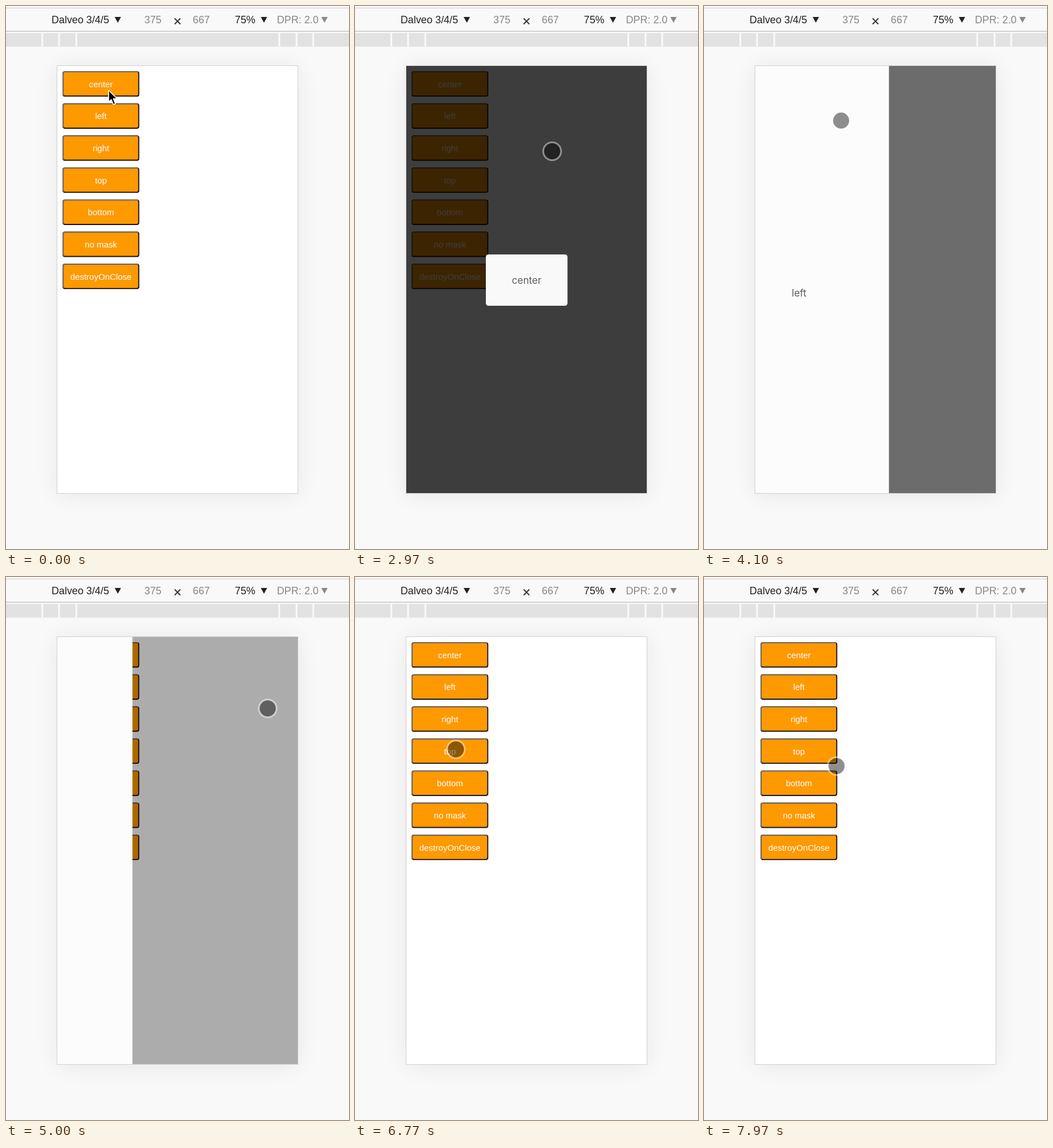
Animation, 595 px wide and 942 px high, one loop 8000 ms. Source, as an HTML page with a canvas:

```html
<!DOCTYPE html>
<html lang="en">
<head>
<meta charset="utf-8">
<title>Popup demo</title>
<style>
  html, body { margin: 0; width: 100%; height: 100%; overflow: hidden; background: #f9f9f9; }
  canvas { display: block; }
</style>
</head>
<body>
<canvas id="stage" width="595" height="942"></canvas>
<script>
const ctx = document.getElementById('stage').getContext('2d');
const LOOP = 8000;
const ZOOM = 1.113;
const PAGE = { x: 89, y: 104, w: 417, h: 741 };
const DRAWER = 280 * ZOOM;
const FADE = 300;
const MASK_ALPHA = 0.775;
const ARROW_UNTIL = 30;
const START = { x: 178, y: 154 };
const END = { t: 7970, x: 230, y: 328 };
const UI_FONT = '"Liberation Sans", Arial, sans-serif';
const POPUP_FONT = '17px Inter, sans-serif';
const LABELS = ['center', 'left', 'right', 'top', 'bottom', 'no mask', 'destroyOnClose'];

// press: the point on the button, tap: the point on the mask that closes the popup,
// leave: when the pointer sets off for the mask, dip: how far that trip sags
const POPUPS = [
  { side: 'center', open: 1900, leave: 2430, close: 2962, press: [158, 143], tap: [342, 252], dip: 190 },
  { side: 'left', open: 3967, leave: 3870, close: 4900, press: [180, 191], tap: [454, 228], dip: 0 },
  { side: 'right', open: 5621, leave: 5850, close: 6190, press: [170, 249], tap: [150, 320], dip: 0 },
  { side: 'top', open: 6880, leave: 6960, close: 7470, press: [175, 299], tap: [250, 460], dip: 0 }
];

const stop = (t, x, y, dip = 0) => ({ t, x, y, dip });

// The pointer looks over the buttons, then goes from button to mask for every popup
const PATH = [
  stop(ARROW_UNTIL, START.x, START.y),
  stop(300, 124, 453), stop(470, 124, 453),
  stop(1270, 162, 339), stop(1430, 161, 148),
  ...POPUPS.flatMap(({ open, leave, close, press, tap, dip }) => [
    stop(Math.min(open, leave) - 120, ...press), stop(leave, ...press),
    stop(close - 250, ...tap, dip), stop(close + 100, ...tap)
  ]),
  stop(END.t, END.x, END.y)
];

// The standard CSS "ease" curve: cubic-bezier(.25, .1, .25, 1)
function ease(x) {
  if (x <= 0) return 0;
  if (x >= 1) return 1;
  const curve = (a, b, s) => 3 * a * s * (1 - s) ** 2 + 3 * b * s * s * (1 - s) + s ** 3;
  let lo = 0, hi = 1;
  for (let i = 0; i < 24; i++) {
    const mid = (lo + hi) / 2;
    if (curve(0.25, 0.25, mid) < x) lo = mid; else hi = mid;
  }
  return curve(0.1, 1, lo);
}

function rect(x, y, w, h, color) {
  ctx.fillStyle = color;
  ctx.fillRect(x, y, w, h);
}

function roundRect(x, y, w, h, r, color) {
  ctx.beginPath();
  ctx.roundRect(x, y, w, h, r);
  ctx.fillStyle = color;
  ctx.fill();
}

function polygon(points, color) {
  ctx.beginPath();
  points.forEach(([x, y]) => ctx.lineTo(x, y));
  ctx.closePath();
  ctx.fillStyle = color;
  ctx.fill();
}

function text(str, x, y, font, color, align = 'left') {
  ctx.font = font;
  ctx.fillStyle = color;
  ctx.textAlign = align;
  ctx.fillText(str, x, y);
}

function drawToolbar() {
  rect(0, 0, 595, 942, '#f9f9f9');
  rect(0, 3, 595, 1, '#cdcdcd');
  rect(0, 43, 595, 1.5, '#c3c3c3');

  const font = '17.8px ' + UI_FONT;
  const dark = '#222', grey = '#888';
  text('Dalveo 3/4/5', 79, 30, font, dark);
  text('375', 240, 30, font, grey);
  text('667', 324, 30, font, grey);
  text('75%', 397, 30, font, dark);
  text('DPR: 2.0', 470, 30, font, grey);
  for (const [x, color] of [[194, dark], [447.5, dark], [552.5, grey]]) {
    polygon([[x - 5.5, 19], [x + 5.5, 19], [x, 29]], color);
  }

  ctx.strokeStyle = '#333';
  ctx.lineWidth = 1.8;
  ctx.beginPath();
  for (const dir of [-1, 1]) {
    ctx.moveTo(297.5 - 5 * dir, 21.5);
    ctx.lineTo(297.5 + 5 * dir, 31.5);
  }
  ctx.stroke();

  // Width marks mirrored around the middle
  rect(0, 47, 595, 23.5, '#e2e2e2');
  for (const d of [176, 206, 235]) {
    for (const x of [298 - d, 298 + d]) rect(x - 1.5, 47, 3, 23.5, '#fafafa');
  }
}

function drawButton(label, x, y) {
  const w = 120 * ZOOM, h = 40 * ZOOM, b = 2.1;
  ctx.save();
  ctx.beginPath();
  ctx.roundRect(x, y, w, h, 4.4);
  ctx.clip();
  rect(x, y, w, h, '#1c1416');
  polygon([[x, y], [x + w, y], [x + w - 4, y + 4], [x + 4, y + h - 4], [x, y + h]], '#6b6564');
  ctx.restore();
  roundRect(x + b, y + b, w - 2 * b, h - 2 * b, 2.4, '#fe9900');
  text(label, x + w / 2, y + 27.7, '14.84px ' + UI_FONT, '#fff', 'center');
}

function drawPage() {
  ctx.save();
  ctx.shadowColor = 'rgba(0,0,0,0.08)';
  ctx.shadowBlur = 38;
  ctx.shadowOffsetY = 3;
  rect(PAGE.x, PAGE.y, PAGE.w, PAGE.h, '#fff');
  ctx.restore();
  rect(PAGE.x - 1, PAGE.y - 1, PAGE.w + 2, PAGE.h + 2, '#d0d0d0');
  rect(PAGE.x, PAGE.y, PAGE.w, PAGE.h, '#fff');
  const margin = 8 * ZOOM;
  LABELS.forEach((label, i) => drawButton(label, PAGE.x + margin, PAGE.y + margin + i * 50 * ZOOM));
}

function drawPopup({ side, open, close }, t) {
  const shown = t < close ? ease((t - open) / FADE) : 1 - ease((t - close) / FADE);
  if (shown <= 0) return;

  ctx.save();
  ctx.beginPath();
  ctx.rect(PAGE.x, PAGE.y, PAGE.w, PAGE.h);
  ctx.clip();
  rect(PAGE.x, PAGE.y, PAGE.w, PAGE.h, `rgba(0,0,0,${MASK_ALPHA * shown})`);

  const hidden = (1 - shown) * DRAWER;
  const panel = '#fcfcfc';
  const label = (x, y) => text(side, x, y, POPUP_FONT, '#5c5c5c', 'center');
  if (side === 'center') {
    ctx.globalAlpha = shown;
    roundRect(227, 431, 141.6, 89, 4.4, panel);
    label(297.7, 482);
  } else if (side === 'top') {
    const y = PAGE.y - hidden;
    rect(PAGE.x, y, PAGE.w, DRAWER, panel);
    label(320, y + DRAWER / 2 + 6.5);
  } else {
    const x = side === 'left' ? PAGE.x - hidden : PAGE.x + PAGE.w - DRAWER + hidden;
    rect(x, PAGE.y, DRAWER, PAGE.h, panel);
    label(x + DRAWER / 2, 504.3);
  }
  ctx.restore();
}

function pointerAt(t) {
  const next = PATH.findIndex(s => s.t > t);
  if (next < 0) return [END.x, END.y];
  const from = PATH[next - 1], to = PATH[next];
  const u = (t - from.t) / (to.t - from.t);
  const k = u * u * (3 - 2 * u);
  const sag = to.dip * Math.sin(Math.PI * k);
  return [from.x + (to.x - from.x) * k, from.y + (to.y - from.y) * k + sag];
}

function drawArrow(x, y) {
  const shape = [[0, 0], [0, 20.5], [4.6, 16.3], [8.3, 25], [11.8, 23.5], [8.2, 15], [14.5, 14.5]];
  polygon(shape.map(([dx, dy]) => [x + dx, y + dy]), '#000');
  ctx.strokeStyle = '#fff';
  ctx.lineWidth = 1.6;
  ctx.lineJoin = 'round';
  ctx.stroke();
}

function drawTouch(x, y) {
  ctx.beginPath();
  ctx.arc(x, y, 14, 0, Math.PI * 2);
  ctx.fillStyle = 'rgba(0,0,0,0.44)';
  ctx.fill();
  ctx.beginPath();
  ctx.arc(x, y, 15.5, 0, Math.PI * 2);
  ctx.strokeStyle = 'rgba(255,255,255,0.42)';
  ctx.lineWidth = 3;
  ctx.stroke();
}

function render() {
  const t = performance.now() % LOOP;
  drawToolbar();
  drawPage();
  POPUPS.forEach(popup => drawPopup(popup, t));
  if (t < ARROW_UNTIL) drawArrow(START.x, START.y - 8);
  else drawTouch(...pointerAt(t));
  requestAnimationFrame(render);
}

render();
</script>
</body>
</html>
```
